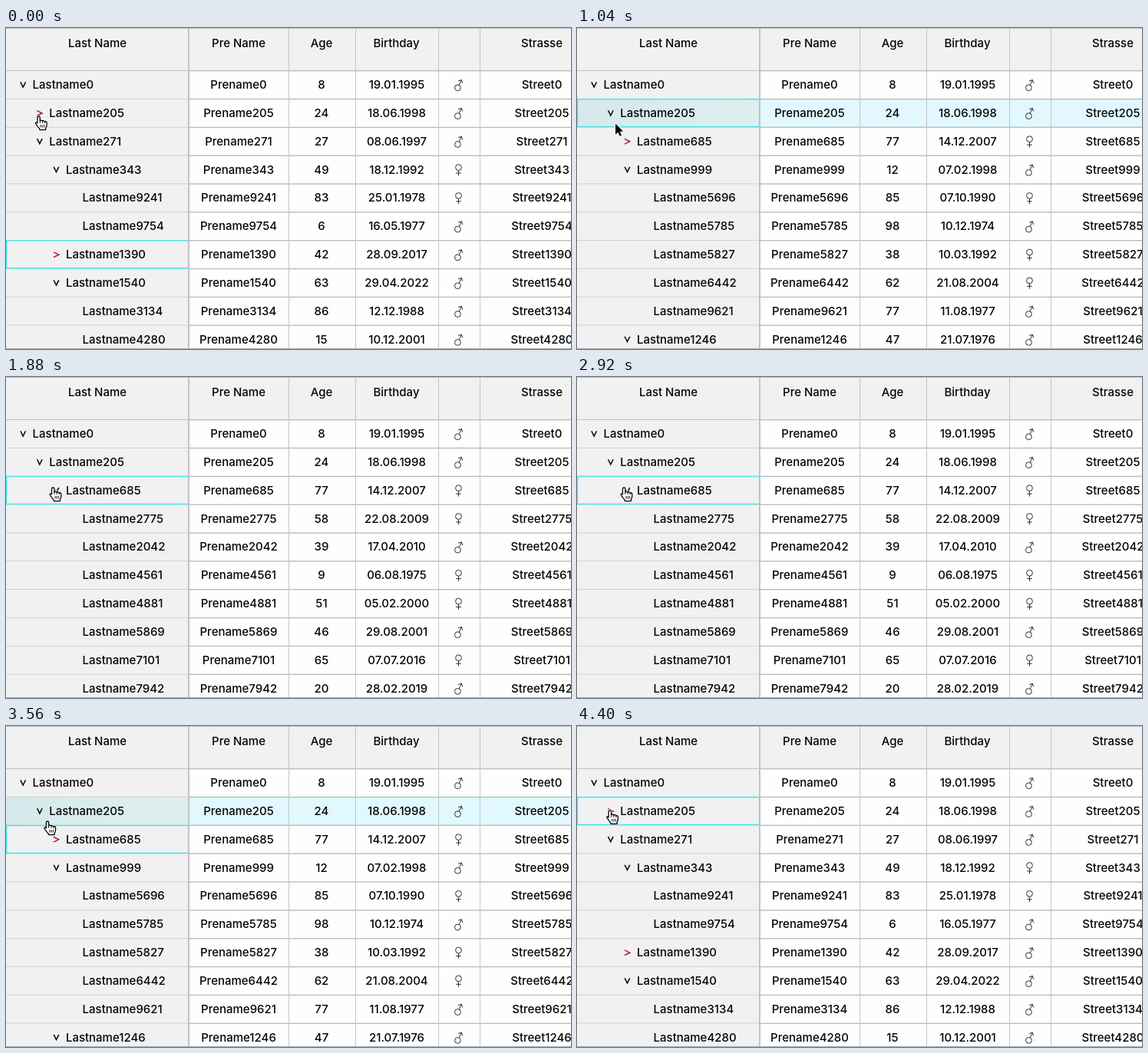
These frames come from a looping animation (736x418 px, 4420 ms). An HTML page with a canvas:

```html
<!DOCTYPE html>
<html lang="en">
<head>
<meta charset="utf-8">
<title>Tree table</title>
<style>
  html, body { margin: 0; width: 100%; height: 100%; overflow: hidden; background: #fff; }
  canvas { display: block; width: 736px; height: 418px; }
</style>
</head>
<body>
<canvas id="stage"></canvas>
<script>
const W = 736, H = 418, LOOP = 4420;
const HEAD = 55.4, ROW = 36.84, FIRST = 238;
const canvas = document.getElementById('stage');
const ctx = canvas.getContext('2d');
const dpr = window.devicePixelRatio || 1;
canvas.width = W * dpr;
canvas.height = H * dpr;

// Each line: indent, toggle (- open, + closed, . leaf), id, age, birthday, sex
const parse = outline => outline.split('\n').filter(s => s.trim()).map(line => {
  const [toggle, id, age, born, sex] = line.trim().split(' ');
  return { level: line.search(/\S/), toggle, id, age, born, sex };
});

const top2 = parse(`
- 0 8 19.01.1995 m
 + 205 24 18.06.1998 m`);
const node685 = parse('  + 685 77 14.12.2007 f');
const siblings = parse(`
 - 271 27 08.06.1997 m
  - 343 49 18.12.1992 f
   . 9241 83 25.01.1978 f
   . 9754 6 16.05.1977 m
  + 1390 42 28.09.2017 m
  - 1540 63 29.04.2022 m
   . 3134 86 12.12.1988 m
   . 4280 15 10.12.2001 m`);
const under205 = parse(`
  - 999 12 07.02.1998 m
   . 5696 85 07.10.1990 f
   . 5785 98 10.12.1974 m
   . 5827 38 10.03.1992 f
   . 6442 62 21.08.2004 f
   . 9621 77 11.08.1977 m
  - 1246 47 21.07.1976 m`);
const under685 = parse(`
   . 2775 58 22.08.2009 f
   . 2042 39 17.04.2010 m
   . 4561 9 06.08.1975 f
   . 4881 51 05.02.2000 f
   . 5869 46 29.08.2001 m
   . 7101 65 07.07.2016 f
   . 7942 20 28.02.2019 m`);

const open = row => ({ ...row, toggle: '-' });
const opened = [top2[0], open(top2[1])];
const views = {
  closed: [...top2, ...siblings],
  open205: [...opened, ...node685, ...under205],
  open685: [...opened, open(node685[0]), ...under685]
};

// Stepped values: [start time, value]
const viewSteps = [[0, 'closed'], [320, 'open205'], [1740, 'open685'], [3240, 'open205'], [4200, 'closed']];
const selectSteps = [[0, 6], [680, 1], [1760, 2], [4140, 1]];
const hoverSteps = [[0, -1], [800, 1], [1240, 2], [1740, -1], [3380, 2], [3480, 1], [4200, -1]];
const cursorSteps = [[0, 'hand'], [1000, 'arrow'], [1560, 'hand']];
// Pointer tip: [time, x, y]
const path = [
  [0, 42.6, 115], [540, 43, 112], [760, 43, 112], [1380, 59.5, 141],
  [1640, 61.2, 144], [3300, 61.2, 144], [3560, 54, 124],
  [3900, 44, 111], [4400, 42.9, 109.9]
];

const stepAt = (steps, t) => steps.filter(s => s[0] <= t).pop()[1];

function tipAt(t) {
  const i = path.findIndex(p => p[0] > t);
  if (i < 0) return path[path.length - 1].slice(1);
  const [t0, x0, y0] = path[i - 1], [t1, x1, y1] = path[i];
  let k = (t - t0) / (t1 - t0);
  k = k * k * (3 - 2 * k);
  return [x0 + (x1 - x0) * k, y0 + (y1 - y0) * k];
}

function fill(x, y, w, h, color) {
  ctx.fillStyle = color;
  ctx.fillRect(x, y, w, h);
}

function text(str, x, y, align = 'center') {
  ctx.fillStyle = '#050505';
  ctx.textAlign = align;
  ctx.fillText(str, x, y);
}

function line(color, width, ...points) {
  ctx.strokeStyle = color;
  ctx.lineWidth = width;
  ctx.beginPath();
  points.forEach(([x, y]) => ctx.lineTo(x, y));
  ctx.stroke();
}

function chevron(x, y, isOpen) {
  if (isOpen) line('#111', 1.6, [x - 3.3, y - 3.4], [x, y + 3.2], [x + 3.3, y - 3.4]);
  else line('#b8183c', 1.5, [x - 3.5, y - 3], [x + 3.3, y + .3], [x - 3.5, y + 3.6]);
}

function sexSign(x, y, sex) {
  const male = sex === 'm', color = '#222', width = .95;
  ctx.strokeStyle = color;
  ctx.lineWidth = width;
  ctx.beginPath();
  ctx.arc(male ? x - 1.1 : x, male ? y + 4 : y - 2.8, 3.9, 0, Math.PI * 2);
  ctx.stroke();
  if (male) {
    line(color, width, [x + .7, y + .5], [x + 3.8, y - 6]);
    line(color, width, [x - .4, y - 4.8], [x + 3.9, y - 6.3], [x + 5.2, y - 2]);
  } else {
    line(color, width, [x, y + 1.1], [x, y + 8]);
    line(color, width, [x - 3.3, y + 4.6], [x + 3.3, y + 4.6]);
  }
}

const rowTop = i => HEAD + ROW * i;

function drawGrid(hover, selected) {
  fill(0, 0, W, H, '#fefefe');
  fill(0, 0, W, 55, '#f1f1f1');
  fill(0, 55, FIRST, H - 55, '#f1f1f1');
  if (hover >= 0) {
    const y = rowTop(hover);
    const tint = ctx.createLinearGradient(0, 0, FIRST, 0);
    tint.addColorStop(0, '#d5e9eb');
    tint.addColorStop(1, '#dfeff0');
    fill(0, y, FIRST, ROW, tint);
    fill(FIRST, y, W - FIRST, ROW, '#e0f8fe');
  }
  for (let i = 0; i < 10; i++) {
    const y = rowTop(i) - .4;
    fill(0, y, FIRST, 1, i ? '#d0d0d0' : '#c0c0c0');
    fill(FIRST, y, W - FIRST, 1.4, '#bcbcbc');
  }

  // The column rule covers the right edge of the selection
  ctx.strokeStyle = '#45e6e8';
  ctx.lineWidth = 1.4;
  ctx.strokeRect(.6, rowTop(selected) + .5, FIRST - 1, ROW - 1);

  [368, 455, 563, 617].forEach(x => fill(x, 0, 1, H, '#c4c4c4'));
  fill(237, 0, 2, H, '#c2c2c2');
  fill(0, 0, W, 1, '#bdbdbd');
  fill(0, H - 1, W, 1, '#a8a8a8');
}

function drawRow(row, i) {
  const mid = rowTop(i + .5), base = mid + 5.2;
  const indent = row.level * 21.65;
  if (row.toggle !== '.') chevron(22.2 + indent, mid, row.toggle === '-');
  text('Lastname' + row.id, 34.6 + indent, base, 'left');
  text('Prename' + row.id, 303, base);
  text(row.age, 411, base);
  text(row.born, 509, base);
  sexSign(589.5, mid, row.sex);
  text('Street' + row.id, 698, base);
}

const arrow = new Path2D('M0 0V14.2L3.3 11.2L5.6 16.4L8 15.3L5.8 10.3H10.2Z');
const hand = new Path2D('M-1.7 9V1.6Q-1.6 0 0 0Q1.6 0 1.7 1.6V6Q2.2 4.9 3.5 5.1Q4.8 5.2 5 6.4' +
  'Q5.5 5.5 6.7 5.8Q7.9 6 8 7.2Q8.6 6.5 9.6 6.9Q10.6 7.3 10.6 8.6V11.5Q10.4 13.8 9.2 15.3V17.6H1.2V16' +
  'Q-.8 14.5 -2 12.3L-3.8 9.8Q-4.5 8.5 -3.5 8Q-2.6 7.7 -1.7 9Z');
const creases = new Path2D('M3 11V14.5M5.2 11V14.5M7.4 11V14.5M1.7 6V9M5 6.4V9M8 7.2V9.4');

function drawCursor(kind, [x, y]) {
  const isHand = kind === 'hand';
  ctx.save();
  ctx.translate(x, y);
  ctx.lineJoin = 'round';
  ctx.strokeStyle = '#fff';
  ctx.lineWidth = isHand ? 2.6 : 2.2;
  ctx.stroke(isHand ? hand : arrow);
  ctx.fillStyle = isHand ? '#fff' : '#000';
  ctx.fill(isHand ? hand : arrow);
  if (isHand) {
    ctx.strokeStyle = '#000';
    ctx.lineWidth = 1.3;
    ctx.stroke(hand);
    ctx.lineWidth = .9;
    ctx.stroke(creases);
  }
  ctx.restore();
}

function draw(t) {
  ctx.setTransform(dpr, 0, 0, dpr, 0, 0);
  ctx.font = '500 15px Inter, "Liberation Sans", sans-serif';
  drawGrid(stepAt(hoverSteps, t), stepAt(selectSteps, t));
  text('Last Name', 119, 25);
  text('Pre Name', 303, 25);
  text('Age', 411, 25);
  text('Birthday', 508.5, 25);
  text('Strasse', 698, 25);
  views[stepAt(viewSteps, t)].forEach(drawRow);
  drawCursor(stepAt(cursorSteps, t), tipAt(t));
}

const start = performance.now();
function frame() {
  draw((performance.now() - start) % LOOP);
  requestAnimationFrame(frame);
}
frame();
</script>
</body>
</html>
```
